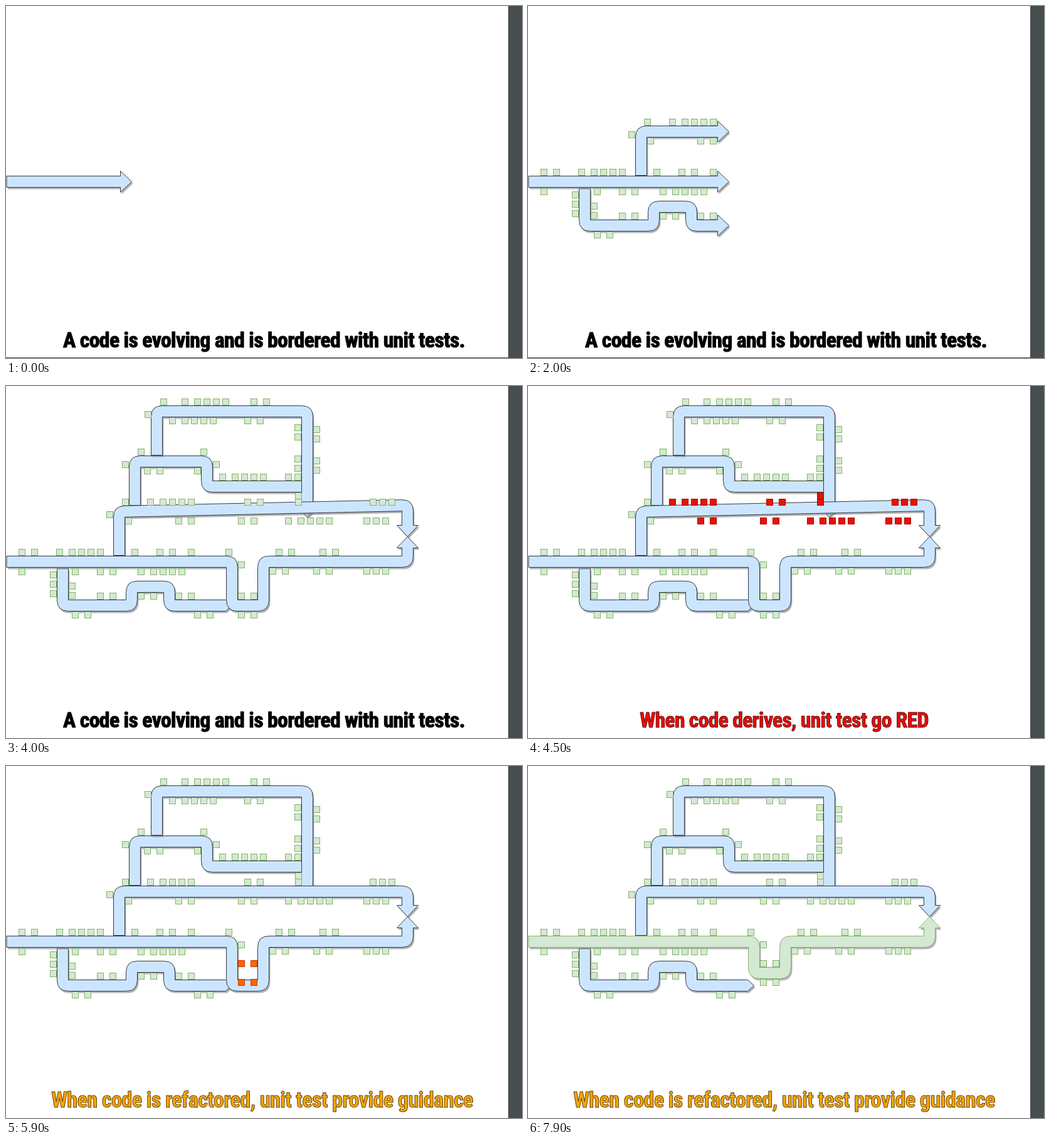
An HTML page for the animation above (8 s loop, 823 px wide and 562 px high).

```html
<!DOCTYPE html>
<html lang="en">
<head>
<meta charset="utf-8">
<title>Unit tests along the code</title>
<style>
  html, body { margin: 0; width: 100%; height: 100%; overflow: hidden; background: #fff; }
  svg { display: block; position: absolute; left: 0; top: 0; }
  text {
    font-family: Impact, "Roboto Condensed", "Open Sans Condensed", Roboto, "Open Sans", sans-serif;
    font-weight: 900;
    font-stretch: 75%;
    letter-spacing: -0.02em;
    text-anchor: middle;
    stroke-linejoin: round;
  }
</style>
</head>
<body>
<svg width="823" height="562" viewBox="0 0 823 562">
  <rect width="823" height="562" fill="#fff"/>
  <rect id="line" y="561" width="801" height="1" fill="#474e50"/>
  <rect x="801" width="22" height="562" fill="#474e50"/>
  <g transform="translate(.5 .5)">
    <g id="pipes"></g>
    <g id="tests"></g>
  </g>
  <g id="captions"></g>
</svg>
<script>
const LOOP = 8000, HALF = 9;
const CUTS = [0, 500, 1000, 1500, 2000, 2500, 3000, 3500, 4000, 4500, 4700,
  5200, 5400, 5900, 6400, 6900, 7400, 7900];
const BLUE = ['#cce5ff', '#36393d'], PINK = ['#f8cecc', '#b85450'],
  PEACH = ['#ffe6cc', '#d79b00'], GREEN = ['#d5e8d4', '#82b366'],
  RED = ['#e51400', '#b20000'], ORANGE = ['#fa6800', '#c73500'];

const $ = id => document.getElementById(id);
function add(parent, tag, attrs) {
  const el = document.createElementNS('http://www.w3.org/2000/svg', tag);
  set(el, attrs);
  parent.appendChild(el);
  return el;
}
function set(el, attrs) {
  for (const k in attrs) el.setAttribute(k, attrs[k]);
}
function show(el, on) {
  el.style.display = on ? '' : 'none';
}

// Outline of a thick arrow along pts: rounded outer corners, sharp inner ones.
function arrow(pts, headLen = 18, headHalf = 17) {
  const n = pts.length - 1;
  const dirs = pts.slice(1).map(([x, y], i) => {
    const dx = x - pts[i][0], dy = y - pts[i][1], len = Math.hypot(dx, dy);
    return [dx / len, dy / len];
  });
  const side = (p, d, w) => [p[0] + d[1] * w, p[1] - d[0] * w];
  const left = ['L' + side(pts[0], dirs[0], HALF)];
  const right = ['L' + side(pts[0], dirs[0], -HALF)];
  for (let i = 1; i < n; i++) {
    const a = dirs[i - 1], b = dirs[i];
    const k = HALF / (1 + a[0] * b[0] + a[1] * b[1]);
    const mx = (a[1] + b[1]) * k, my = -(a[0] + b[0]) * k;
    const s = a[0] * b[1] - a[1] * b[0] > 0 ? 1 : -1;
    const [x, y] = pts[i];
    const inner = [x - s * mx, y - s * my], outer = [x + s * mx, y + s * my];
    const from = side(inner, a, s * 2 * HALF), to = side(inner, b, s * 2 * HALF);
    if (s > 0) {
      left.push(`L${from}Q${outer} ${to}`);
      right.push('L' + inner);
    } else {
      left.push('L' + inner);
      right.push(`L${to}Q${outer} ${from}`);
    }
  }
  const d = dirs[n - 1], tip = pts[n];
  const base = [tip[0] - d[0] * headLen, tip[1] - d[1] * headLen];
  left.push('L' + side(base, d, HALF), 'L' + side(base, d, headHalf), 'L' + tip);
  right.push('L' + side(base, d, -headHalf) + 'L' + side(base, d, -HALF));
  return 'M' + left.join('').slice(1) + right.reverse().join('') + 'Z';
}

const PIPES = [
  { // inner bypass
    from: 2500,
    path: t => arrow([[205, 190], [205, 120], [320, 120], [320, 160], [t < 3000 ? 440 : 488, 160]])
  },
  { // outer bypass
    from: 2500,
    path: t => arrow([[240, 110], [240, 40],
      ...(t < 3000 ? [[440, 40]] : [[480, 40], [480, 209]])])
  },
  { // lower branch
    from: 1000,
    path(t) {
      const start = [[90, 291], [90, 350]];
      if (t < 2000) return arrow([...start, [200, 350]]);
      const bump = [...start, [200, 350], [200, 320], [260, 320], [260, 350]];
      return t < 2500 ? arrow([...bump, [320, 350]]) : arrow([...bump, [360, 350]], 10, HALF);
    }
  },
  { // upper branch
    from: 2000,
    path(t) {
      const start = [[180, 270], [180, 200]];
      if (t < 3500) return arrow([...start, [t < 2500 ? 320 : t < 3000 ? 440 : 560, 200]]);
      return arrow([...start, [640, t >= 4000 && t < 5900 ? 190 : 200], [640, 240]]);
    },
    look: t => t >= 4700 && t < 5200 || t >= 5400 && t < 5900 ? PINK : BLUE
  },
  { // trunk
    from: 0,
    path(t) {
      if (t < 2500) return arrow([[0.5, 280], [t < 2000 ? 200 : 320, 280]]);
      const dip = t < 6900 ? 350 : 330;
      const end = t < 3000 ? [[440, 280]] : t < 3500 ? [[560, 280]] : [[640, 280], [640, 240]];
      return arrow([[0.5, 280], [360, 280], [360, dip], [410, dip], [410, 280], ...end]);
    },
    look: t => t < 6400 ? BLUE : t < 7900 ? PEACH : GREEN
  }
];
for (const p of PIPES) {
  p.g = add($('pipes'), 'g', {});
  p.shadow = add(p.g, 'path', { transform: 'translate(2 3)', fill: '#808080', opacity: .6 });
  p.body = add(p.g, 'path', { 'stroke-width': 1 });
}

const tests = [];
function test(from, x, y, opts) {
  const el = add($('tests'), 'rect', { x: x - 5, y: y - 5, width: 10, height: 10 });
  tests.push({ el, from, until: LOOP, look: () => GREEN, ...opts });
}
const row = (from, y, xs, opts) => xs.forEach(x => test(from, x, y, opts));
const col = (from, x, ys, opts) => ys.forEach(y => test(from, x, y, opts));

const derived = { look: t => t >= 4500 && t < 5900 ? RED : GREEN };
const moved = { look: t => t < 7400 ? ORANGE : GREEN };

// trunk
row(500, 265, [25, 45, 85, 105, 120, 135, 150]);
row(500, 296, [25, 110, 150, 170]);
row(2000, 265, [205, 245, 265, 295]);
row(2000, 296, [215, 235, 250, 265, 280]);
row(2500, 265, [355]);
row(2500, 285, [375]);
for (const y of [335, 365]) row(2500, y, [375, 395], { until: 5900 });
for (const y of [315, 345]) row(5900, y, [375, 395], moved);
row(3000, 265, [435, 455, 505, 525]);
row(3000, 295, [425, 445, 495, 515]);
row(3500, 295, [575, 590, 605]);
// lower branch
col(1500, 75, [301, 316, 331]);
col(1500, 105, [319, 334]);
row(1500, 335, [150, 170]);
row(1500, 365, [110, 130]);
row(2000, 335, [215, 235, 275, 295]);
row(2500, 365, [305, 325]);
// upper branch
row(2000, 205, [165]);
row(2000, 185, [190]);
row(2000, 215, [195]);
row(2000, 185, [230, 250, 265, 280, 295], derived);
row(2000, 215, [275, 295], derived);
row(2500, 185, [385, 405], derived);
row(2500, 215, [375, 395], derived);
row(3000, 215, [450, 470, 485, 500, 515], derived);
col(3000, 466, [175, 185], derived);
row(3500, 185, [585, 600, 615], derived);
row(3500, 215, [575, 590, 605], derived);
// inner bypass
row(2500, 105, [215, 315]);
row(2500, 125, [190, 335]);
row(2500, 135, [225, 245, 305]);
row(2500, 145, [345, 365, 380, 395, 410]);
row(3000, 145, [450, 465]);
// outer bypass
row(2500, 45, [226]);
row(2500, 25, [251, 285, 305, 320, 335, 350, 395, 415]);
row(2500, 55, [265, 285, 300, 315, 330, 385, 405]);
col(3000, 465, [66, 81, 116, 131]);
col(3000, 495, [69, 84, 119, 134]);

const captions = [
  caption(0, 4500, 'A code is evolving and is bordered with unit tests.', 411.5, 641, '#000', '#000'),
  caption(4500, 5900, 'When code derives, unit test go RED', 408.5, 461, '#f80808', '#5a1010'),
  caption(5900, LOOP, 'When code is refactored, unit test provide guidance', 408.5, 673, '#ffa500', '#5c430c')
];
function caption(from, until, words, x, width, fill, stroke) {
  const el = add($('captions'), 'text', { x, y: 545, fill, stroke, 'stroke-width': 1 });
  el.textContent = words;
  el.style.fontSize = '30px';
  // one font size for the line, chosen from its natural width
  el.style.fontSize = Math.min(36, 30 * width / el.getComputedTextLength()) + 'px';
  return { el, from, until };
}

function draw(t) {
  show($('line'), t < 2500);
  for (const p of PIPES) {
    show(p.g, t >= p.from);
    if (t < p.from) continue;
    const d = p.path(t), [fill, stroke] = p.look ? p.look(t) : BLUE;
    set(p.shadow, { d });
    set(p.body, { d, fill, stroke });
  }
  for (const q of tests) {
    const [fill, stroke] = q.look(t);
    show(q.el, t >= q.from && t < q.until);
    set(q.el, { fill, stroke });
  }
  for (const c of captions) show(c.el, t >= c.from && t < c.until);
}

const start = performance.now();
let shown = -1;
function tick() {
  const t = (performance.now() - start) % LOOP;
  const cut = CUTS.filter(c => c <= t).pop();
  if (cut !== shown) draw(shown = cut);
  requestAnimationFrame(tick);
}
tick();
</script>
</body>
</html>
```
